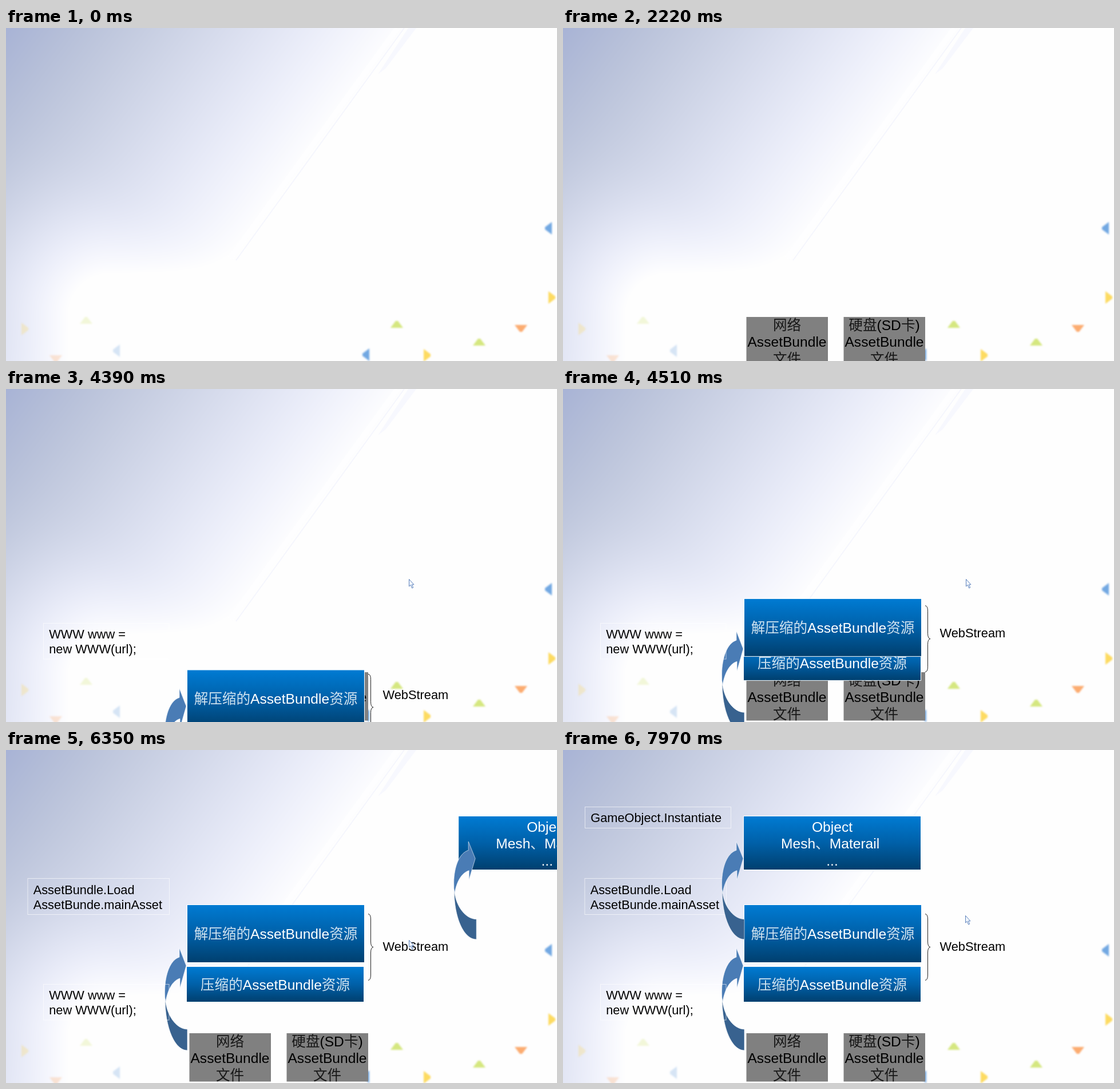
These frames come from a looping animation (963 by 582 pixels, 8 s). An HTML page with a canvas:

```html
<!DOCTYPE html>
<html lang="zh-CN">
<head>
<meta charset="utf-8">
<title>Resource loading flow</title>
<style>
  html, body { margin: 0; width: 100%; height: 100%; overflow: hidden; background: #fefefe; }
  canvas, svg { position: absolute; left: 0; top: 0; width: 963px; height: 582px; display: block; }
  svg { overflow: hidden; }
  text { font-family: "Liberation Sans", "Noto Sans CJK SC Light", "Noto Sans CJK SC", "Noto Sans CJK", sans-serif; font-weight: 300; white-space: pre; }
</style>
</head>
<body>
<canvas id="sky" width="963" height="582"></canvas>
<svg id="stage" viewBox="0 0 963 582">
  <defs>
    <linearGradient id="blue" x2="0" y2="1">
      <stop offset="0" stop-color="#007bd3"/>
      <stop offset=".5" stop-color="#0060a8"/>
      <stop offset="1" stop-color="#003f6e"/>
    </linearGradient>
    <filter id="soft" x="-5%" y="-5%" width="110%" height="110%"><feGaussianBlur stdDeviation="1.8"/></filter>
  </defs>
</svg>
<script>
const W = 963, H = 582, LOOP = 8000, SLIDE_BOTTOM = 655;
const STEP = 120;             // ms between two poses of a moving part
const STRIDE = STEP / 370;    // share of a flight covered per pose
const stage = document.getElementById('stage');

function el(parent, tag, attrs, content) {
  const node = document.createElementNS('http://www.w3.org/2000/svg', tag);
  for (const key in attrs) node.setAttribute(key, attrs[key]);
  if (content) node.textContent = content;
  parent.appendChild(node);
  return node;
}

// Background: the colour deepens with the distance to the white area,
// which is bounded by a slanted line and a rounded lower corner.
function paintSky() {
  const ctx = document.getElementById('sky').getContext('2d');
  const image = ctx.createImageData(W, H);
  for (let y = 0, p = 0; y < H; y++) {
    for (let x = 0; x < W; x++, p += 4) {
      const line = (698 - x - 0.74 * y) * 0.805;
      const corner = (Math.hypot(Math.max(180 - x, 0), Math.max(500 - y, 0)) - 70) * 1.8;
      const blend = 40 * Math.log(1 + Math.exp(-Math.abs(line - corner) / 40));
      const d = Math.max(0, Math.min(1, (Math.min(line, corner) - blend) / 563));
      image.data[p] = 254 - 86 * d;
      image.data[p + 1] = 254 - 75 * d;
      image.data[p + 2] = 254 - 40 * d * d * (3 - 2 * d);
      image.data[p + 3] = 255;
    }
  }
  ctx.putImageData(image, 0, 0);
}

el(stage, 'path', { d: 'M684 0L392 402', stroke: '#fefeff', 'stroke-width': 9 });
el(stage, 'path', { d: 'M696 0L402 406', stroke: '#f5f6fd', 'stroke-width': 2 });
el(stage, 'path', { d: 'M703 0H717L664 70L650 81Z', fill: '#f7f8fe' });

// Confetti: each colour points its own way; pieces on the left are faint.
const confetti = el(stage, 'g', { filter: 'url(#soft)' });
function scatter(fill, turn, ...points) {
  for (const [x, y] of points) el(confetti, 'path', {
    d: 'M-11 6H11L2 -6H-2Z', transform: `translate(${x} ${y}) rotate(${turn})`,
    fill, opacity: x < 200 ? .28 : .95
  });
}
scatter('#6aa3e0', 270, [948, 350], [629, 571], [193, 564]);
scatter('#fdd958', 90, [954, 471], [736, 572], [33, 526]);
scatter('#fca868', 180, [900, 525], [87, 578]);
scatter('#d3e679', 0, [827, 549], [683, 518], [140, 511]);

// A part appears at `start` with the share `left` of its flight (dx, dy) to go.
const parts = [];
function part(start, left, dx, dy) {
  const node = el(stage, 'g', {});
  parts.push({ node, start, left, dx, dy });
  return node;
}
const rising = (start, left, top) => part(start, left, 0, SLIDE_BOTTOM - top);

function lines(parent, rows, x, y, size, step, fill = '#000', anchor = 'start') {
  rows.forEach((row, i) => {
    const text = el(parent, 'text', { x, y: y + i * step, 'font-size': size, fill, 'text-anchor': anchor });
    // Chinese runs look lighter than Latin ones.
    for (const run of row.match(/[\u3000-\u9fff]+|[^\u3000-\u9fff]+/g))
      el(text, 'tspan', { 'fill-opacity': run > '\u3000' ? .82 : 1 }, run);
  });
}

function block(parent, x, y, width, height, rows, baseline) {
  el(parent, 'rect', { x: x - .5, y: y - .5, width: width + 1, height: height + 1, fill: 'url(#blue)', stroke: '#fff' });
  lines(parent, rows, x + width / 2, baseline, 24.6, 29.5, '#fff', 'middle');
}

function note(parent, x, y, width, height, rows, baseline) {
  el(parent, 'rect', { x, y, width, height, fill: 'none', stroke: '#fff', 'stroke-opacity': .6 });
  lines(parent, rows, x + 9.7, baseline, 21.8, 26.4);
}

function curvedArrow(parent, transform) {
  const g = el(parent, 'g', { transform, stroke: '#fff', 'stroke-width': .6, 'stroke-linejoin': 'round' });
  el(g, 'path', { d: 'M278 434C278 486 295 525 317 525V488C299 488 283 467 279 441Z', fill: '#38628f' });
  el(g, 'path', { d: 'M279 441Q277 432 277.5 421C278 392 287 367 303 362V346L315 377L304 416V399C291 403 282 420 279 441Z', fill: '#4a7cb5' });
}

const files = rising(2070, .387, 495);
[[320.5, '网络'], [490.5, '硬盘(SD卡)']].forEach(([x, title]) => {
  el(files, 'rect', { x, y: 495, width: 142.5, height: 84.5, fill: '#808080' });
  lines(files, [title, 'AssetBundle', '文件'], x + 71, 517.5, 24.6, 29.5, '#000', 'middle');
});

const loaded = top => rising(4390, .574, top);
block(loaded(379), 316, 379, 309, 61, ['压缩的AssetBundle资源'], 419);
block(loaded(271), 317, 271, 309, 100, ['解压缩的AssetBundle资源'], 330);
el(loaded(286), 'path', {
  d: 'M633 286.5Q637.5 287 637.5 296V335Q637.5 344 642 344.5Q637.5 345 637.5 354V393Q637.5 402 633 402.5',
  fill: 'none', stroke: '#222'
});
lines(loaded(323), ['WebStream'], 658.5, 351, 21.8, 0);
curvedArrow(loaded(346), '');

note(rising(3280, .35, 409), 65.5, 409.5, 219.5, 62.5, ['WWW www =', 'new WWW(url);'], 436);
note(rising(5370, .664, 224), 38, 224.5, 247.5, 63, ['AssetBundle.Load', 'AssetBunde.mainAsset'], 251.5);

const shown = dx => part(6350, .73, dx, 0);
block(shown(651), 316, 116, 309, 93, ['Object', 'Mesh、Materail ', '...'], 142.5);
curvedArrow(shown(692), 'translate(0 -170.4) scale(1 .955)');
note(part(7580, .828, -294, 0), 38.5, 99.5, 255, 37, ['GameObject.Instantiate'], 126);

const cursor = el(stage, 'path', {
  d: 'M.5 .5V13L3.2 10.4L5.6 16L7.7 15.1L5.4 9.9H9Z',
  fill: '#f3f8ff', stroke: '#4c74b4', 'stroke-width': .9, 'stroke-linejoin': 'round'
});
const moves = [
  { start: 270, poses: 4, x: 685, y: 425 },
  { start: 1560, poses: 3, x: 680, y: 387 },
  { start: 1950, poses: 2, x: 702, y: 500 },
  { start: 2610, poses: 1, x: 723, y: 442 },
  { start: 2760, poses: 3, x: 704, y: 332 },
  { start: 6470, poses: 3, x: 703, y: 289 }
];

const posesSince = (start, t) => Math.floor((t - start) / STEP);

function placeCursor(t) {
  let x = 676, y = 516;
  for (const move of moves) {
    const k = Math.max(0, Math.min(1, (posesSince(move.start, t) + 1) / move.poses));
    x += (move.x - x) * k;
    y += (move.y - y) * k;
  }
  const hidden = t < 120 || (t >= 2220 && t < 2610);
  cursor.setAttribute('visibility', hidden ? 'hidden' : 'visible');
  cursor.setAttribute('transform', `translate(${Math.round(x)} ${Math.round(y)})`);
}

function render(t) {
  for (const { node, start, left, dx, dy } of parts) {
    const rest = Math.max(0, left - STRIDE * posesSince(start, t));
    node.setAttribute('visibility', t < start ? 'hidden' : 'visible');
    node.setAttribute('transform', `translate(${dx * rest} ${dy * rest})`);
  }
  placeCursor(t);
}

paintSky();
const begin = performance.now();
function loop() {
  render((performance.now() - begin) % LOOP);
  requestAnimationFrame(loop);
}
loop();
</script>
</body>
</html>
```
